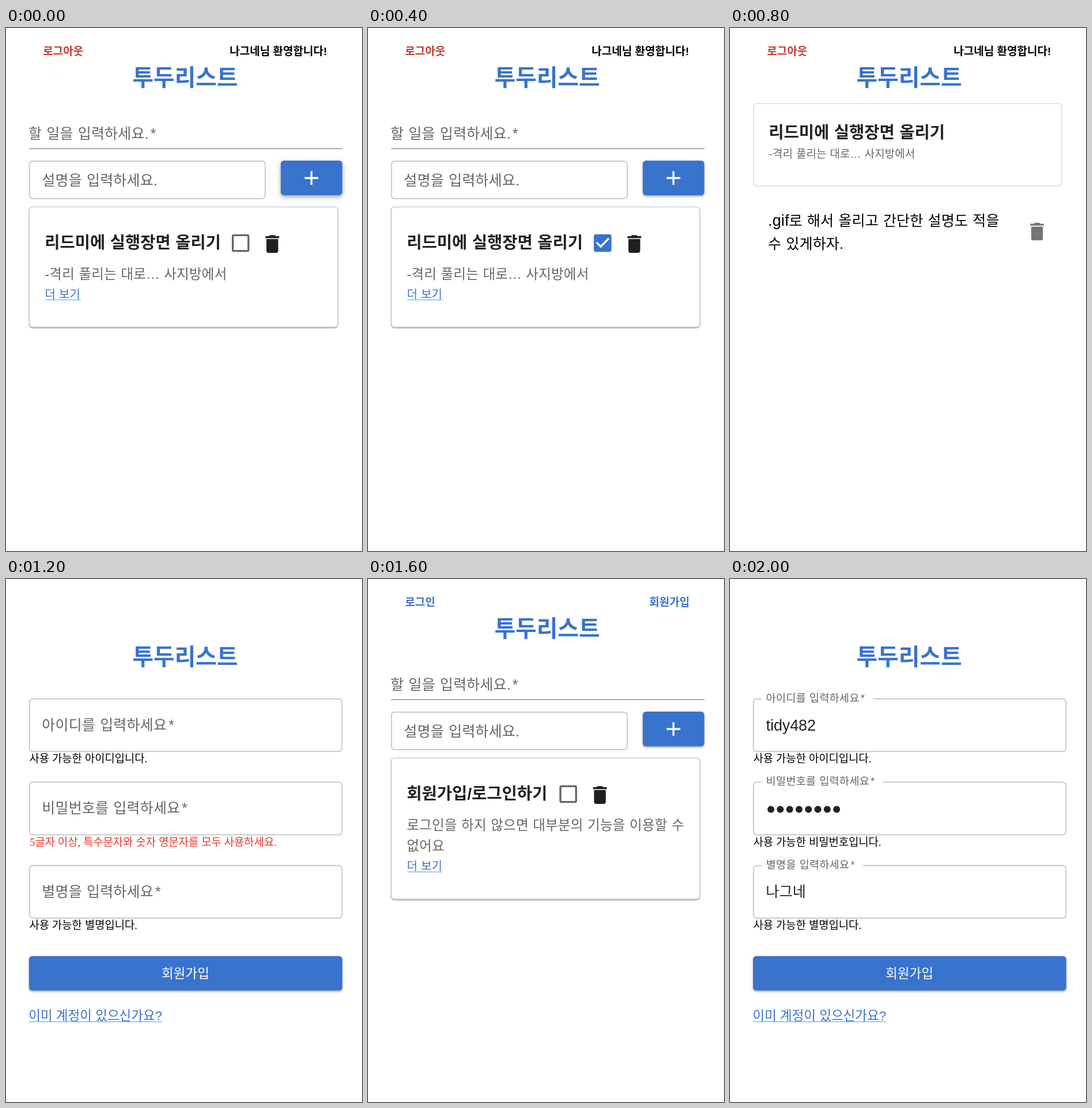
An HTML page for the animation above (2400 ms loop, 618 by 907 pixels).

```html
<!DOCTYPE html>
<html lang="ko">
<head>
<meta charset="utf-8">
<title>투두리스트</title>
<style>
  html, body { margin: 0; width: 100%; height: 100%; overflow: hidden; background: #fff; }
  #strip { display: block; width: 3708px; height: 907px; animation: flip 2400ms steps(6) infinite; }
  @keyframes flip { to { transform: translateX(-3708px); } }

  text { font-family: "Liberation Sans", "Noto Sans CJK KR", "Noto Sans CJK", sans-serif; white-space: pre; }
  .title { font-size: 39.8px; font-weight: 700; text-anchor: middle; }
  .nav { font-size: 19px; font-weight: 700; }
  .field { font-size: 25px; letter-spacing: .2px; word-spacing: .9px; }
  .label { font-size: 18.7px; letter-spacing: .15px; word-spacing: .6px; }
  .head { font-size: 28.5px; font-weight: 700; word-spacing: .7px; }
  .desc { font-size: 23.5px; letter-spacing: .2px; word-spacing: .8px; }
  .small { font-size: 18.9px; letter-spacing: .15px; word-spacing: .6px; }
  .more { font-size: 20px; word-spacing: .6px; }
  .link, .action { font-size: 22.5px; }
  .action { text-anchor: middle; letter-spacing: .1px; }
  .help { font-family: "Liberation Serif", "Noto Sans CJK KR", "Noto Sans CJK", serif; font-size: 18.8px; word-spacing: .3px; }
  .latin { font-size: 26.8px; }

  .outline { fill: none; stroke: #c4c4c4; stroke-width: 1.7; }
  .pale { stroke: #dedede; }
  .card { fill: #fff; stroke: #d8d8d8; stroke-width: 1.4; filter: drop-shadow(0 1.8px .9px rgba(0,0,0,.5)); }
  .button { fill: #3873cd; filter: drop-shadow(0 2px 1.5px rgba(0,0,0,.28)) drop-shadow(0 1px 3px rgba(0,0,0,.12)); }
  .raised { filter: drop-shadow(0 3px 3px rgba(0,0,0,.26)) drop-shadow(0 2px 6px rgba(0,0,0,.14)); }
</style>
</head>
<body>
<svg id="strip" viewBox="0 0 3708 907"></svg>
<script>
const BLUE = '#3873cd', RED = '#c5392f', ERROR = '#e6352b', GREY = '#666', INK = '#222', BLACK = '#000';
const USER = '나그네', LOGIN = 'tidy482';
const REQUIRED = '<tspan dx=".12em">*</tspan>';

const ICONS = {
  trash: 'M6 19c0 1.1.9 2 2 2h8c1.1 0 2-.9 2-2V7H6v12zM19 4h-3.5l-1-1h-5l-1 1H5v2h14V4z',
  empty: 'M19 5v14H5V5h14m0-2H5c-1.1 0-2 .9-2 2v14c0 1.1.9 2 2 2h14c1.1 0 2-.9 2-2V5c0-1.1-.9-2-2-2z',
  checked: 'M19 3H5c-1.11 0-2 .9-2 2v14c0 1.1.89 2 2 2h14c1.11 0 2-.9 2-2V5c0-1.1-.89-2-2-2zm-9 14l-5-5 1.41-1.41L10 14.17l7.59-7.59L19 8l-9 9z',
  plus: 'M19 13h-6v6h-2v-6H5v-2h6V5h2v6h6v2z'
};

const text = (style, x, y, fill, content) =>
  `<text class="${style}" x="${x}" y="${y}" fill="${fill}">${content}</text>`;
const box = (style, left, top, right, bottom) =>
  `<rect class="${style}" x="${left}" y="${top}" width="${right - left}" height="${bottom - top}" rx="5.5"/>`;
const line = (x1, x2, y, color, width) =>
  `<path d="M${x1} ${y}H${x2}" stroke="${color}" stroke-width="${width}"/>`;
const icon = (name, cx, cy, fill) =>
  `<path d="${ICONS[name]}" fill="${fill}" transform="translate(${cx} ${cy}) scale(1.7) translate(-12 -12)"/>`;
const title = y => text('title', 311, y, BLUE, '투두리스트');

const memberNav = text('nav', 64.3, 47, RED, '로그아웃') +
  text('nav', 388.3, 47, BLACK, `${USER}님 환영합니다!`);
const guestNav = text('nav', 64.3, 47, BLUE, '로그인') +
  text('nav', 488.3, 47, BLUE, '회원가입');

const TASK = '리드미에 실행장면 올리기';
const NOTE = '-격리 풀리는 대로… 사지방에서';

function listScene({ nav, task, notes, checkX, checked, raised }) {
  const extra = (notes.length - 1) * 36.5;
  return nav + title(100) +
    text('field', 39, 191.5, GREY, '할 일을 입력하세요.' + REQUIRED) +
    line(40, 584, 209.2, '#949494', 1.5) +
    box('outline', 40.7, 230.8, 450, 295.8) +
    text('field', 62.3, 273, GREY, '설명을 입력하세요.') +
    box(raised ? 'button raised' : 'button', 477, 230, 583.7, 290) +
    icon('plus', 530.3, 260.2, '#fff') +
    box('card', 40.7, 310.5, 575.6, 518.5 + extra) +
    text('head', 67.3, 381.5, INK, task) +
    icon(checked ? 'checked' : 'empty', checkX, 373, checked ? BLUE : GREY) +
    icon('trash', checkX + 55, 374.6, '#1f1f1f') +
    notes.map((note, i) => text('desc', 67.3, 434.8 + i * 36.5, GREY, note)).join('') +
    text('more', 67.5, 468.5 + extra, BLUE, '더 보기') +
    line(68, 129.5, 471.5 + extra, '#8fb2e4', 1.4);
}

function detailScene() {
  return memberNav + title(100) +
    box('outline pale', 40.7, 131, 575.6, 274) +
    text('head', 67.3, 190.5, INK, TASK) +
    text('small', 67.5, 225, GREY, NOTE) +
    text('field', 66, 342.5, BLACK, '<tspan class="latin">.gif</tspan>로 해서 올리고 간단한 설명도 적을') +
    text('field', 66, 383, BLACK, '수 있게하자.') +
    icon('trash', 533, 353, '#757575');
}

function signupScene(filled) {
  const fields = [
    { label: '아이디를', help: '아이디', notch: 248,
      value: text('latin', 62.5, 263, INK, LOGIN) },
    { label: '비밀번호를', help: '비밀번호', notch: 266, error: !filled,
      value: `<path d="M71 399.5h115" stroke="${INK}" stroke-width="12" stroke-linecap="round" stroke-dasharray="0 16.3"/>` },
    { label: '별명을', help: '별명', notch: 231,
      value: text('field', 62.3, 551, INK, USER) }
  ];
  return title(149) + fields.map((field, i) => {
    const y = i * 144.5, label = field.label + ' 입력하세요' + REQUIRED;
    return box('outline', 40.7, 207.8 + y, 583.2, 299.2 + y) +
      (filled
        ? line(55, field.notch, 207.8 + y, '#fff', 4) + text('label', 62.5, 212.8 + y, GREY, label) + field.value
        : text('field', 62.3, 261.5 + y, GREY, label)) +
      (field.error
        ? text('help', 41, 318 + y, ERROR, '5글자 이상, 특수문자와 숫자 영문자를 모두 사용하세요.')
        : text('help', 40.5, 318 + y, BLACK, `사용 가능한 ${field.help}입니다.`));
  }).join('') +
    box('button', 40, 654, 583.7, 713.5) +
    text('action', 311.5, 692, '#fff', '회원가입') +
    text('link', 39.2, 764.5, BLUE, '이미 계정이 있으신가요?') +
    line(40, 270.5, 767.8, '#8fb2e4', 1.4);
}

const memberList = { nav: memberNav, task: TASK, notes: [NOTE], checkX: 407.3 };
const guestList = {
  nav: guestNav, task: '회원가입/로그인하기', checkX: 347.6,
  notes: ['로그인을 하지 않으면 대부분의 기능을 이용할 수', '없어요']
};

const scenes = [
  listScene({ ...memberList, raised: true }),
  listScene({ ...memberList, checked: true }),
  detailScene(),
  signupScene(false),
  listScene(guestList),
  signupScene(true)
];
document.getElementById('strip').innerHTML = scenes
  .map((scene, i) => `<svg x="${i * 618}" width="618" height="907">${scene}</svg>`).join('');
</script>
</body>
</html>
```
